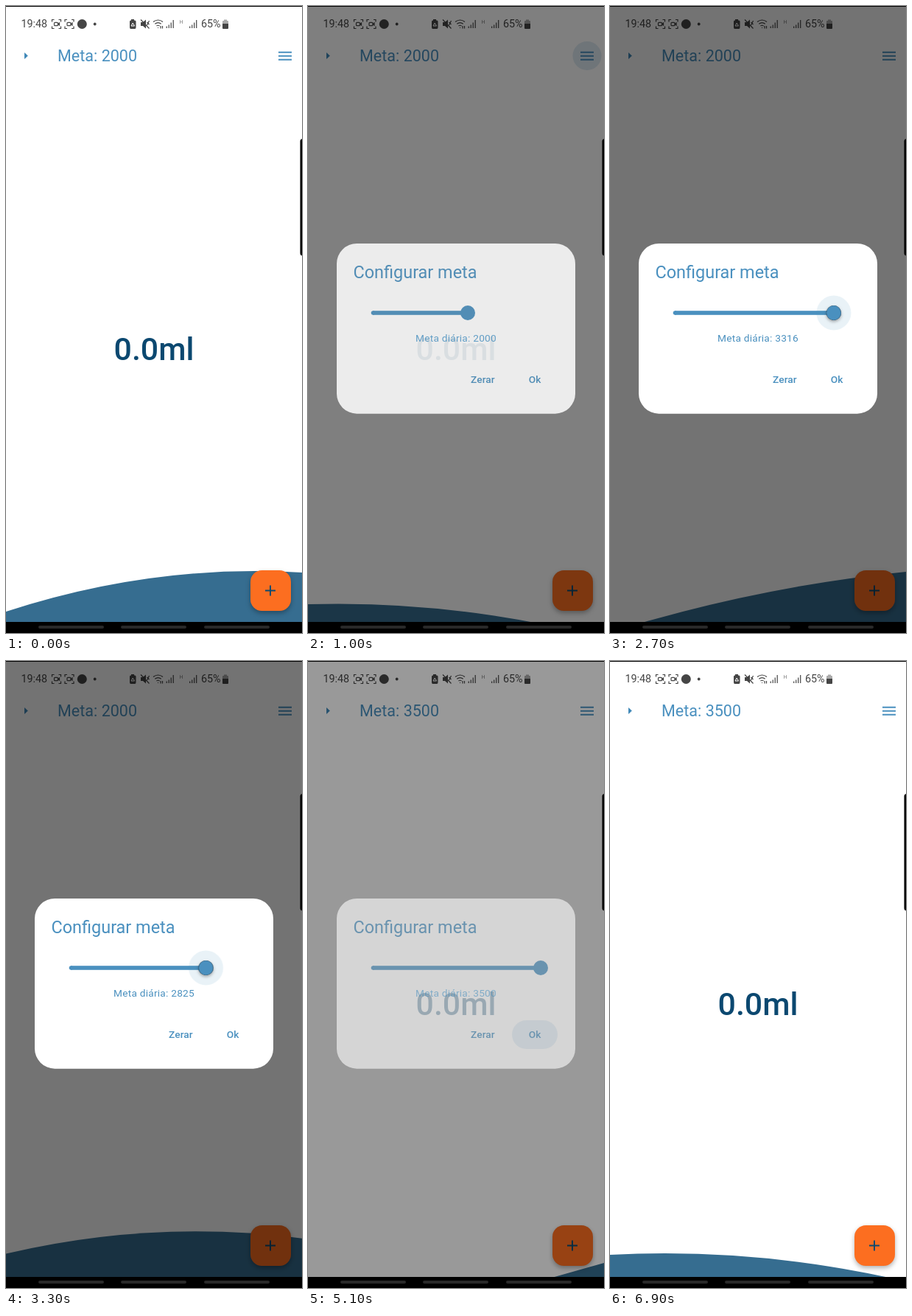
Recreate the animation shown at these times as an HTML page without scripts. Size 402 by 850 pixels, loop 7000 ms.

```html
<!DOCTYPE html>
<html lang="pt">
<head>
<meta charset="utf-8">
<title>Meta diária</title>
<style>
@property --goal { syntax: "<integer>"; inherits: true; initial-value: 2000; }

html, body { margin: 0; width: 100%; height: 100%; overflow: hidden; background: #fff; }
body { position: relative; animation: drag 7s ease-in-out infinite; }
svg { position: absolute; left: 0; top: 0; display: block; }
text, .label { font-family: Roboto, sans-serif; fill: #4a90bf; color: #4a90bf; }
.status, .status text { fill: #454545; }
.line { fill: none; stroke: #454545; stroke-width: 1.2; }
.button { font-size: 13.68px; font-weight: 500; letter-spacing: .1px; }
.fab { filter: drop-shadow(0 3px 3px rgba(0,0,0,.3)); }

.wave, .scrim, .dialog, .ripple, .halo, .press, .before, .after {
  animation: 7s linear infinite;
}
.wave { animation-name: wave; }
.scrim { animation-name: scrim; }
.dialog { animation-name: dialog; }
.ripple { animation-name: ripple; }
.halo { animation-name: halo; }
.press { animation-name: press; }
.before { animation-name: before; }
.after { animation-name: after; }

.track { transform: translate(88px, 413.2px) scaleX(calc(var(--goal) / 3500)); }
.thumb { transform: translate(calc(85px + var(--goal) * .066px), 416px); }
.label {
  position: absolute; left: 146px; top: 440px; white-space: pre;
  font-size: 13.68px; line-height: 20px; letter-spacing: .244px;
}
.label::after { counter-reset: goal var(--goal); content: counter(goal); }

@keyframes drag {
  0%, 21.429% { --goal: 2000; }
  38.571% { --goal: 3316; }
  57.143% { --goal: 2189; }
  65.714%, 100% { --goal: 3500; }
}
/* The swell repeats every 3 s and is cut off when the loop restarts. */
@keyframes wave {
  0%, 42.857%, 85.714% { d: path("M0 821Q201 755.5 402 768V900H0Z"); }
  6.429%, 49.286%, 92.143% { d: path("M0 795Q201 757 402 790V900H0Z"); }
  12.857%, 55.714%, 98.571% { d: path("M0 805Q201 794.3 402 841V900H0Z"); }
  14.286%, 57.143%, 100% { d: path("M0 811Q201 805 402 857V900H0Z"); }
  21.429%, 64.286% { d: path("M0 865Q201 870 402 890V900H0Z"); }
  30%, 72.857% { d: path("M0 931Q201 873 402 816V900H0Z"); }
  38.571%, 81.429% { d: path("M0 849Q201 787 402 767V900H0Z"); }
}
@keyframes scrim {
  0%, 12.143% { opacity: 0; }
  12.857% { opacity: .4; }
  14.286% { opacity: .91; }
  15.714%, 71.429% { opacity: 1; }
  72.857% { opacity: .73; }
  74.286% { opacity: .3; }
  75.714%, 100% { opacity: 0; }
}
@keyframes dialog {
  0%, 12.143% { opacity: 0; }
  12.857% { opacity: .35; }
  14.286% { opacity: .85; }
  15.714%, 71.429% { opacity: 1; }
  72.857% { opacity: .6; }
  74.286% { opacity: .2; }
  75.714%, 100% { opacity: 0; }
}
@keyframes ripple {
  0%, 10% { opacity: 0; }
  11.429%, 14.286% { opacity: .18; }
  17.143%, 100% { opacity: 0; }
}
@keyframes halo {
  0%, 21.429% { opacity: 0; }
  22.857%, 67.143% { opacity: 1; }
  68.571%, 100% { opacity: 0; }
}
@keyframes press {
  0%, 69.5% { opacity: 0; }
  71.429%, 73% { opacity: .14; }
  75.714%, 100% { opacity: 0; }
}
@keyframes before {
  0%, 71.42% { opacity: 1; }
  71.43%, 100% { opacity: 0; }
}
@keyframes after {
  0%, 71.42% { opacity: 0; }
  71.43%, 100% { opacity: 1; }
}
</style>
</head>
<body>
<svg width="402" height="850" viewBox="0 0 402 850">
  <defs>
    <g id="capture" class="line">
      <path d="M0 3V0H3M9 0H12V3M12 9V12H9M3 12H0V9"/>
      <rect x="3" y="3.8" width="5" height="4.4" rx="1"/>
      <path d="M8 6L10 4.5V7.5Z"/>
    </g>
    <path id="signal" class="line" d="M.7 12V9.5M3.7 12V7.5M6.7 12V4.5M9.7 12V1"/>
  </defs>
  <rect width="402" height="850" fill="#fff"/>

  <g class="status">
    <text x="20.5" y="29" font-size="14.3">19:48</text>
    <use href="#capture" x="62.5" y="18.5"/>
    <use href="#capture" x="80" y="18.5"/>
    <circle cx="103.3" cy="24.5" r="6.5"/>
    <circle cx="120.7" cy="24.5" r="1.9"/>
    <path d="M170 19.5V18H174V19.5H175Q176.500 19.5 176.500 21V29Q176.500 31 175 31H169.500Q168 31 168 29V21Q168 19.500 169.500 19.500Z"/>
    <path d="M170 27L172.200 23L174.500 27Z" fill="none" stroke="#fff"/>
    <path d="M183 22H186L190 18.500V30.500L186 27H183Z"/>
    <path class="line" d="M183 18.500L194.500 30.500M191.500 22L194.500 25M191.500 26L194.500 20"/>
    <path class="line" d="M200 21.500Q206.500 16.500 213 21.500M202.300 24.300Q206.500 21 210.700 24.300M204.500 27Q206.500 25.500 208.500 27M206 29.500H207M210 27V30.500M212.500 30.500V27"/>
    <use href="#signal" x="217.5" y="18"/>
    <text x="235.500" y="24" font-size="7" opacity=".7">H</text>
    <use href="#signal" x="249" y="18"/>
    <text x="265" y="29" font-size="14.3">65%</text>
    <path d="M296 20V18.500H300V20H301Q302 20 302 21V24H294V21Q294 20 295 20Z" fill="#aaa"/>
    <path d="M294 24H302V30Q302 31 301 31H295Q294 31 294 30Z"/>
  </g>

  <path d="M25 63L29.800 67.500L25 72Z" fill="#3f88b8"/>
  <g font-size="21.5">
    <text x="70" y="74.500">Meta: <tspan class="value"></tspan></text>
    <text class="before" x="129.700" y="74.500">2000</text>
    <text class="after" x="129.700" y="74.500">3500</text>
  </g>
  <circle class="ripple" cx="379" cy="67.500" r="19.500" fill="#4a90bf"/>
  <path d="M370 62.700H388M370 67.700H388M370 72.700H388" stroke="#4a90bf" stroke-width="2"/>
  <text x="201" y="480" text-anchor="middle" font-size="42.8" font-weight="500" style="fill:#0b4870">0.0ml</text>

  <path class="wave" d="M0 821Q201 755.5 402 768V900H0Z" fill="#366d90"/>
  <rect class="fab" x="332" y="765" width="55" height="55" rx="15.600" fill="#fc6e20"/>
  <path d="M352 792.500H366M359 785.500V799.500" stroke="#0d4a6e" stroke-width="2"/>

  <rect class="scrim" width="402" height="850" fill="#000" fill-opacity=".55"/>

  <g class="dialog">
    <rect x="39" y="322" width="324" height="230.700" rx="27.300" fill="#fff"/>
    <text x="61.500" y="369" font-size="23.45">Configurar meta</text>
    <circle cx="88.500" cy="416" r="2.800" fill="#4a90bf"/>
    <rect class="track" width="228" height="5.600" fill="#4a90bf"/>
    <g class="thumb">
      <g class="halo">
        <circle r="23.500" fill="#4a90bf" fill-opacity=".12"/>
        <circle r="10" style="filter:drop-shadow(0 2px 2px rgba(0,0,0,.35))"/>
      </g>
      <circle r="10" fill="#4a90bf"/>
    </g>
    <rect class="press" x="277" y="487" width="62" height="39" rx="19.500" fill="#4a90bf"/>
    <text class="button" x="221" y="511">Zerar</text>
    <text class="button" x="299.700" y="511">Ok</text>
  </g>

  <rect width="402" height="1" fill="#000"/>
  <rect x="399.500" y="180" width="8" height="158.500" rx="3.500" fill="#000"/>
  <rect y="835" width="402" height="15" fill="#000"/>
  <path d="M46 842H131M158 842H243M271 842H356" stroke="#292929" stroke-width="4" stroke-linecap="round"/>
</svg>
<div class="label dialog">Meta diária: </div>
</body>
</html>
```
